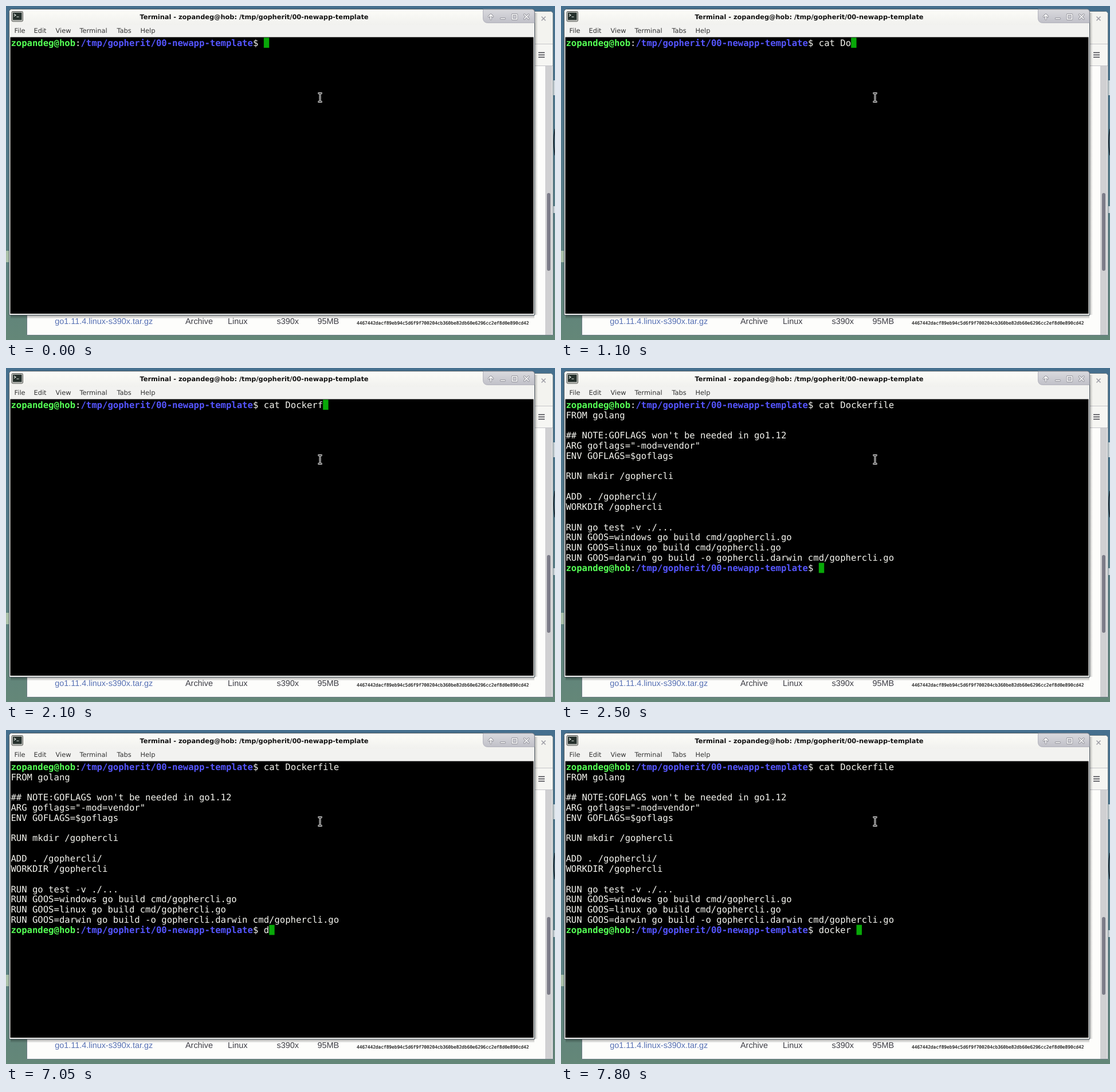
An HTML page that plays this animation: 958x584 px, repeating every 8 s.

```html
<!DOCTYPE html>
<html lang="en">
<head>
<meta charset="utf-8">
<title>Terminal</title>
<style>
  html, body { margin: 0; width: 100%; height: 100%; overflow: hidden; background: #4f7488; }
  svg { display: block; width: 958px; height: 584px; }
  text { white-space: pre; text-rendering: geometricPrecision; }
  .ui { font: 11.4px "DejaVu Sans", sans-serif; fill: #333; }
  .title { font: bold 11.35px "DejaVu Sans", sans-serif; fill: #111; text-anchor: middle; }
  .page { font: 14.4px "Liberation Sans", Arial, sans-serif; fill: #3c3c44; }
  .page .link { fill: #5670b4; }
  .hash { font: 7.81px "DejaVu Sans Mono", monospace; fill: #111; stroke: #111; stroke-width: .2; }
  .term { font: 15.6px "DejaVu Sans Mono", monospace; fill: #f4f4ee; }
  .user { font-weight: bold; fill: #55ff55; }
  .path { font-weight: bold; fill: #5555ff; }
</style>
</head>
<body>
<svg viewBox="0 0 958 584">
  <defs>
    <linearGradient id="desk" x2="0" y2="1">
      <stop offset="0" stop-color="#456f8e"/>
      <stop offset=".5" stop-color="#547a88"/>
      <stop offset="1" stop-color="#648778"/>
    </linearGradient>
    <linearGradient id="bar" x2="0" y2="1">
      <stop offset="0" stop-color="#fcfcf8"/>
      <stop offset="1" stop-color="#f1f1ee"/>
    </linearGradient>
    <linearGradient id="tab" x2="0" y2="1">
      <stop offset="0" stop-color="#dadade"/>
      <stop offset="1" stop-color="#c0c0c8"/>
    </linearGradient>
    <linearGradient id="shadeY" x2="0" y2="1">
      <stop offset="0" stop-color="#000" stop-opacity=".38"/>
      <stop offset="1" stop-color="#000" stop-opacity="0"/>
    </linearGradient>
    <linearGradient id="shadeX">
      <stop offset="0" stop-color="#000" stop-opacity=".28"/>
      <stop offset="1" stop-color="#000" stop-opacity="0"/>
    </linearGradient>
    <path id="buttons" d="M846 23v-8m-3.500 3.500l3.500-3.500l3.500 3.500M863.500 22h7M883.500 15h8v8h-8zM904.500 15l7.500 7.500m0-7.500l-7.500 7.500"/>
  </defs>

  <!-- desktop -->
  <rect width="958" height="584" fill="url(#desk)"/>
  <path d="M0 428h5v20H0z" fill="#a9c0a8"/>
  <path d="M955 130h3v26h-3zM955 350h3v12h-3z" fill="#c8d2d6"/>
  <path d="M958 215q-4 22 0 46" fill="none" stroke="#20303a" stroke-width="2"/>

  <!-- browser window -->
  <path d="M36.500 575.500V14.500q0-5 5-5H949.500q5 0 5 5V575.500z" fill="#fdfdfb" stroke="#6c7c84"/>
  <path d="M900 10H949q5 0 5 5V66H900z" fill="#f3f3ef"/>
  <path d="M900 67H954V104H900z" fill="#f6f6f3"/>
  <path d="M900 66.500H954M900 104.500H954" stroke="#c4c4c8"/>
  <path d="M934.500 18.500l7 7m0-7l-7 7" stroke="#a0a0a8" stroke-width="1.600"/>
  <path d="M929 81.500h11M929 85.500h11M929 89.500h11" stroke="#3c3c44" stroke-width="1.500"/>
  <rect x="941" y="105" width="12" height="470" fill="#d0d0d2"/>
  <rect x="944" y="327" width="6" height="136" rx="3" fill="#7c7c88"/>
  <g class="page">
    <text class="link" x="85.300" y="556">go1.11.4.linux-s390x.tar.gz</text>
    <text x="313" y="556">Archive</text>
    <text x="387" y="556">Linux</text>
    <text x="472.500" y="556">s390x</text>
    <text x="543.500" y="556">95MB</text>
  </g>
  <text class="hash" x="612" y="557">4467442dacf89eb94c5d6f9f700204cb360be82db60e6296cc2ef8d0e890cd42</text>

  <!-- terminal window -->
  <rect x="8" y="540" width="914" height="7" fill="url(#shadeY)"/>
  <rect x="922" y="12" width="6" height="528" fill="url(#shadeX)"/>
  <path d="M5.500 540.500V10.500q0-5 5-5H917.500q5 0 5 5V540.500z" fill="#f2f2f0" stroke="#4c5860"/>
  <path d="M6 33V11q0-5 5-5H917q5 0 5 5V33z" fill="url(#bar)"/>
  <path d="M832.500 6V21q0 8.500 8.500 8.500H922V11q0-5-5-5z" fill="url(#tab)" stroke="#b2b2bc"/>
  <g fill="none" stroke-linejoin="round" stroke-linecap="round">
    <use href="#buttons" stroke="#8e8e96" stroke-width="3.400"/>
    <use href="#buttons" stroke="#fff" stroke-width="1.700"/>
  </g>
  <rect x="10" y="9.500" width="19.500" height="17.500" rx="2" fill="#c9cac6" stroke="#50524e"/>
  <rect x="12" y="11.500" width="15.500" height="13" fill="#25302c"/>
  <path d="M14 14l3 2l-3 2M18.500 19h4" fill="none" stroke="#e6ece6" stroke-width="1.200"/>
  <text class="title" x="433" y="22.800">Terminal - zopandeg@hob: /tmp/gopherit/00-newapp-template</text>
  <g class="ui">
    <text x="14.500" y="46.700">File</text>
    <text x="48.500" y="46.700">Edit</text>
    <text x="86.500" y="46.700">View</text>
    <text x="128.500" y="46.700">Terminal</text>
    <text x="193.500" y="46.700">Tabs</text>
    <text x="234.500" y="46.700">Help</text>
  </g>
  <rect x="7.500" y="54.500" width="913" height="483.500"/>
  <g class="term">
    <g id="rows"></g>
    <rect id="caret" width="9.400" height="17.700" fill="#08a808"/>
  </g>

  <!-- mouse pointer -->
  <g fill="none">
    <path d="M544.500 152.500h7M544.500 167.500h7M548 153v14" stroke="#fff" stroke-width="3"/>
    <path d="M545 152.500h6M545 167.500h6M548 153v14" stroke="#000"/>
  </g>
</svg>
<script>
const LOOP = 8000, LEFT = 8.4, TOP = 55.4, CELL = 9.392, PITCH = 17.83, ASCENT = 14.28;
const USER = 'zopandeg@hob', PATH = '/tmp/gopherit/00-newapp-template';
const PROMPT_LEN = USER.length + PATH.length + 3;
const CAT = 'cat Dockerfile ', DOCKER = 'docker ';
const OUTPUT = `FROM golang

## NOTE:GOFLAGS won't be needed in go1.12
ARG goflags="-mod=vendor"
ENV GOFLAGS=$goflags

RUN mkdir /gophercli

ADD . /gophercli/
WORKDIR /gophercli

RUN go test -v ./...
RUN GOOS=windows go build cmd/gophercli.go
RUN GOOS=linux go build cmd/gophercli.go
RUN GOOS=darwin go build -o gophercli.darwin cmd/gophercli.go`.split('\n');

// [time, characters visible]; the last step of CAT_KEYS is a tab completion
const CAT_KEYS = [[100, 1], [250, 2], [500, 3], [650, 4], [850, 5], [1000, 6],
  [1350, 7], [1500, 8], [1650, 9], [1850, 10], [2000, 11], [2150, 15]];
const ENTER = 2350;
const DOCKER_KEYS = [[7050, 1], [7200, 2], [7300, 3], [7450, 4], [7550, 5], [7650, 6], [7750, 7]];

const rows = document.getElementById('rows');
const caret = document.getElementById('caret');

function add(parent, tag, text, attrs = {}) {
  const el = document.createElementNS('http://www.w3.org/2000/svg', tag);
  el.textContent = text;
  for (const k in attrs) el.setAttribute(k, attrs[k]);
  return parent.appendChild(el);
}

const addRow = (parent, r, text = '') =>
  add(parent, 'text', text, { x: LEFT, y: Math.round(TOP + r * PITCH + ASCENT) });

function addPrompt(parent, r) {
  const line = addRow(parent, r);
  add(line, 'tspan', USER, { class: 'user' });
  add(line, 'tspan', ':');
  add(line, 'tspan', PATH, { class: 'path' });
  add(line, 'tspan', '$ ');
  return add(line, 'tspan', '', { x: LEFT + PROMPT_LEN * CELL });
}

const first = addPrompt(rows, 0);
const result = add(rows, 'g', '');
OUTPUT.forEach((s, i) => addRow(result, i + 1, s));
const second = addPrompt(result, OUTPUT.length + 1);

const typed = (keys, t) => keys.reduce((n, [at, len]) => t >= at ? len : n, 0);

let shown = '';
function draw(now) {
  const t = now % LOOP;
  const done = t >= ENTER;
  const n = typed(done ? DOCKER_KEYS : CAT_KEYS, t);
  const state = done + ':' + n;
  if (state !== shown) {
    shown = state;
    first.textContent = done ? CAT : CAT.slice(0, n);
    second.textContent = done ? DOCKER.slice(0, n) : '';
    result.setAttribute('visibility', done ? 'visible' : 'hidden');
    caret.setAttribute('x', LEFT + (PROMPT_LEN + n) * CELL);
    caret.setAttribute('y', TOP + (done ? OUTPUT.length + 1 : 0) * PITCH);
  }
  requestAnimationFrame(() => draw(performance.now()));
}
draw(performance.now());
</script>
</body>
</html>
```
